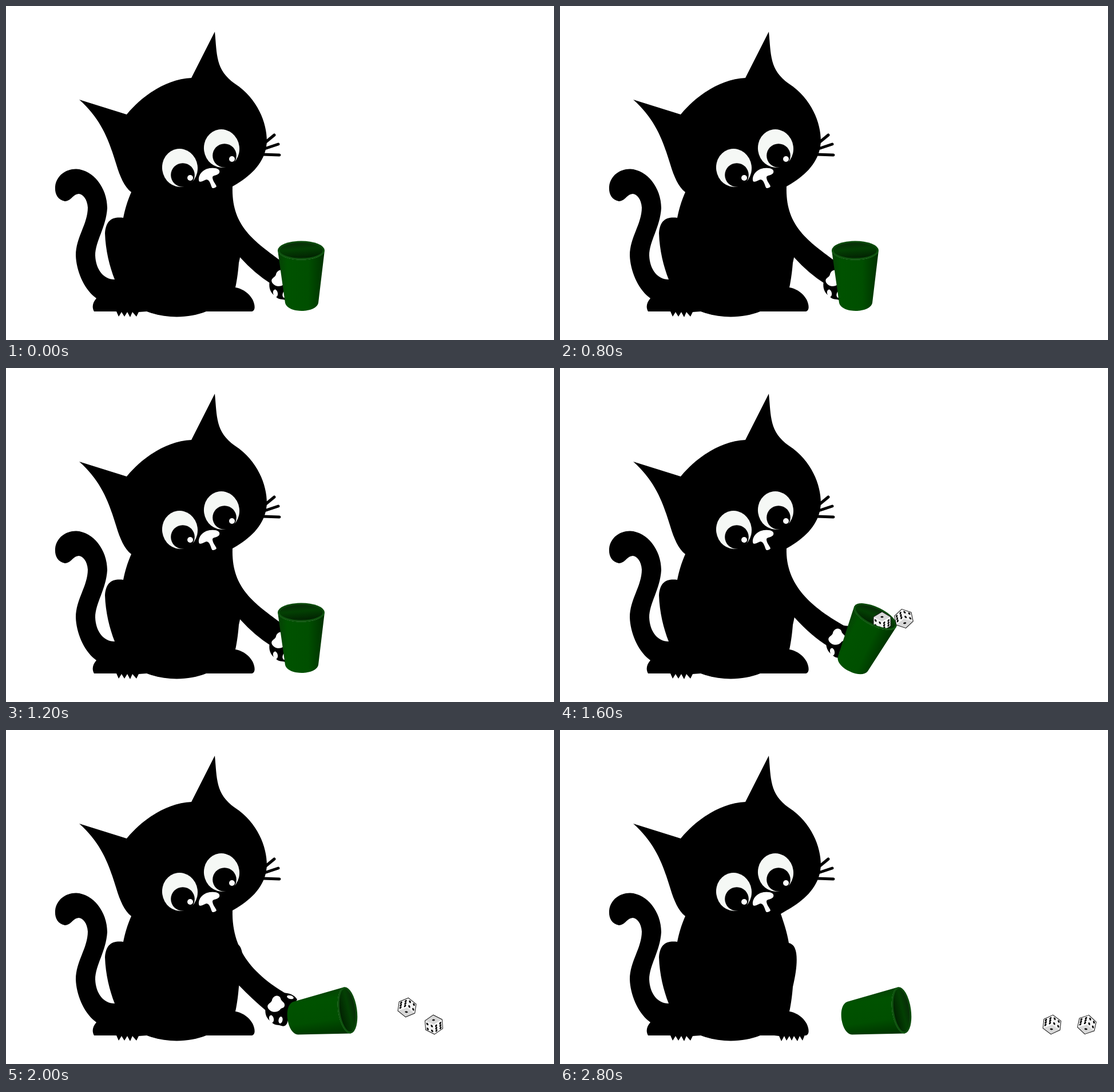
Write an HTML page that moves like this. It is 958x585 px and loops after 3400 ms.

```html
<!DOCTYPE html>
<html lang="en">
<head>
<meta charset="utf-8">
<title>Cat rolling dice</title>
<style>
html, body { margin: 0; width: 100%; height: 100%; overflow: hidden; background: #fff; }
svg { display: block; width: 100%; height: 100%; }
</style>
</head>
<body>
<svg viewBox="0 0 958 585">
  <defs>
    <linearGradient id="side">
      <stop offset="0" stop-color="#064006"/>
      <stop offset=".2" stop-color="#005200"/>
      <stop offset=".65" stop-color="#004f00"/>
      <stop offset="1" stop-color="#003000"/>
    </linearGradient>
    <linearGradient id="inside" x1="0" y1="0" x2=".25" y2="1">
      <stop offset="0" stop-color="#0a260a"/>
      <stop offset=".5" stop-color="#034003"/>
      <stop offset="1" stop-color="#022402"/>
    </linearGradient>
    <g id="die">
      <path d="M0-17L15-8V8L0 17L-15 8V-8Z" fill="#fff"/>
      <path d="M0 0L15 8L0 17L-15 8Z" fill="#d8d8d8"/>
      <path d="M0 0V-17L15-8V8Z" fill="#f1f1f1"/>
      <g id="pips"></g>
      <path d="M0-17L15-8V8L0 17L-15 8V-8Z" fill="none" stroke="#111" stroke-linejoin="round"/>
    </g>
  </defs>

  <g id="tail">
    <path d="M103 342C90 339 85 329 86 316C88 297 105 285 123 285.500C152 287 177 318 177 354C175 388 156 412 156 437C157 461 170 479 190 479L215 520L158 512C136 496 123 464 122 437C122 405 143 382 143 353C142 338 134 329 127 329C115 331 115 341 103 342Z"/>
  </g>
  <path id="body" d="M219 326C212 342 208 356 205 371C188 369 175 373 173 398C174 428 181 456 190 479L158 512C151 520 150 528 154 535H193L197 544L202 536L207 544L212 536L217 545L221 536L228 544L232 536L246 535C280 548 320 547 350 535H430C437 533 435 522 431 514C424 502 413 495 401 493C404 479 406 463 407 450C413 425 415 405 413 391C411 379 407 375 400 373C397 354 391 337 386 322Z"/>
  <path id="claws" d="M366 534L383 536L387 545L392 536L396 544L401 536L405 544L409 536L415 545L419 536L424 544L428 534Z"/>
  <g id="limb">
    <path id="arm"/>
    <g id="paw">
      <path d="M-18 0C-22 15-19 25-8 32C-4 38 4 36 8 38C14 40 18 38 20 28L26 10L36-8C30-20 10-22 0-18Z"/>
      <g fill="#fff">
        <path d="M-15 7C-18-1-9-1-8-7C-6-16 5-17 7-10C8-4 15-4 14 3C13 8 8 6 6 10C2 15-10 16-15 7Z"/>
        <ellipse cx="-9" cy="26" rx="4" ry="6.500" transform="rotate(-12 -9 26)"/>
        <ellipse cx="7" cy="28" rx="3.500" ry="6" transform="rotate(10 7 28)"/>
        <ellipse cx="24" cy="-12" rx="6" ry="3" transform="rotate(15 24 -12)"/>
      </g>
    </g>
  </g>
  <path id="head" d="M365 45C369 85 366 112 400 136C440 162 456 205 456 236C455 275 425 300 396 316L386 322L300 345L219 326C207 317 199 298 193 278C182 243 170 201 128 164L211 190C241 154 282 128 324 126Z"/>
  <path d="M452 240L469 226M452 250L476 242M450 260L478 261" stroke="#000" stroke-width="5" stroke-linecap="round"/>
  <g fill="#f5f8f5">
    <ellipse cx="304" cy="283.500" rx="31" ry="33.500" transform="rotate(-8 304 283.500)"/>
    <ellipse cx="377" cy="249.500" rx="31" ry="33.500" transform="rotate(-8 377 249.500)"/>
    <path fill="#fff" d="M337 305C336 293 348 284 358 284C368 283 375 286 373 292C371 297 361 296 361 300C361 306 366 311 368 316C366 319 361 320 360 318C357 311 356 304 350 304C344 306 338 311 337 305Z"/>
  </g>
  <g id="pupils">
    <circle cx="309" cy="296" r="20.800"/>
    <circle cx="382" cy="262" r="20.800"/>
    <circle cx="322" cy="301" r="5" fill="#fff"/>
    <circle cx="395" cy="268" r="5" fill="#fff"/>
  </g>

  <g id="cupBack">
    <ellipse cx="-1" cy="-87" rx="41" ry="16.500" fill="#0c4a0c"/>
    <ellipse cx="-1" cy="-86.500" rx="38" ry="14" fill="url(#inside)"/>
  </g>
  <use id="dieA" href="#die"/>
  <g id="cupFront">
    <path d="M-42-87A41 16.500 0 0 0 40-87L29 5C27 14 14 19 0 19C-14 19-27 14-29 5Z" fill="url(#side)"/>
    <path d="M-40.500-87A39.500 15 0 0 0 38.500-87" fill="none" stroke="#0f540f" stroke-width="3"/>
  </g>
  <use id="dieB" href="#die"/>
</svg>
<script>
const STEP = 200, STEPS = 17;
const $ = id => document.getElementById(id);

// Cup angle, cup base, paw, arm: two controls, upper end, lower control, lower end, armpit
const poses = [
  [0, 517, 515, 480, 477, 394, 382, 428, 408, 480, 446, 435, 469, 464, 487, 409, 440],
  [26, 514, 514, 485, 471, 394, 380, 440, 420, 500, 453, 440, 470, 468, 487, 410, 437],
  [82, 511, 504, 473, 480, 394, 392, 440, 436, 508, 472, 430, 471, 455, 492, 407, 447]
];
const tilts = [0, 6, 0, 11.5, 0, 6, 0, 11.5, 26, 55, 82];

// From the step where the dice leave the cup: x, y, turn
const rollA = [[563, 444, 180], [632, 465, 275], [701, 486, 8], [745, 505, 100], [785, 516, 190], [825, 516, 280], [860, 516, 6]];
const rollB = [[601, 439, -12], [673, 482, 80], [748, 516, 176], [795, 517, 250], [838, 517, 300], [872, 517, 340], [921, 516, 12]];
const looks = { 11: [4, -7], 12: [5, -10], 13: [5, -11] };

function face(matrix, spots) {
  const dots = spots.map(([x, y]) => `<circle cx="${x}" cy="${y}" r=".12"/>`).join('');
  return `<g transform="matrix(${matrix} 0 0)">${dots}</g>`;
}
const four = [[.25, .25], [.25, .75], [.75, .25], [.75, .75]];
$('pips').innerHTML =
  face('0 -17 -15 8', [...four, [.5, .25], [.5, .75]]) +
  face('0 -17 15 8', four) +
  face('15 8 -15 8', [[.5, .5]]);

function poseAt(angle) {
  const i = angle < poses[1][0] ? 0 : 1;
  const [a, b] = [poses[i], poses[i + 1]];
  const k = (angle - a[0]) / (b[0] - a[0]);
  return a.map((v, n) => v + (b[n] - v) * k);
}

function place(id, x, y, turn = 0) {
  $(id).setAttribute('transform', `translate(${x} ${y}) rotate(${turn})`);
}

function show(id, on) {
  $(id).setAttribute('visibility', on ? 'visible' : 'hidden');
}

function draw(step) {
  const [angle, bx, by, px, py, ...p] = poseAt(tilts[Math.min(step, 10)]);
  place('cupBack', bx, by, angle);
  place('cupFront', bx, by, angle);
  place('paw', px, py);
  $('arm').setAttribute('d',
    `M370 316H396C${p.slice(0, 6)}L${px} ${py}L${p[8]} ${p[9]}Q${p[6]} ${p[7]} ${p[10]} ${p[11]}L370 420Z`);

  const resting = step >= 13;
  show('limb', !resting);
  show('claws', resting);

  const rolling = step >= 8;
  show('dieA', rolling);
  show('dieB', rolling);
  if (rolling) {
    const n = Math.min(step - 8, 6);
    place('dieA', ...rollA[n]);
    place('dieB', ...rollB[n]);
  }
  place('pupils', ...(looks[step] || [0, 0]));
}

const start = performance.now();
function tick() {
  draw(Math.floor((performance.now() - start) / STEP) % STEPS);
  requestAnimationFrame(tick);
}
tick();
</script>
</body>
</html>
```
